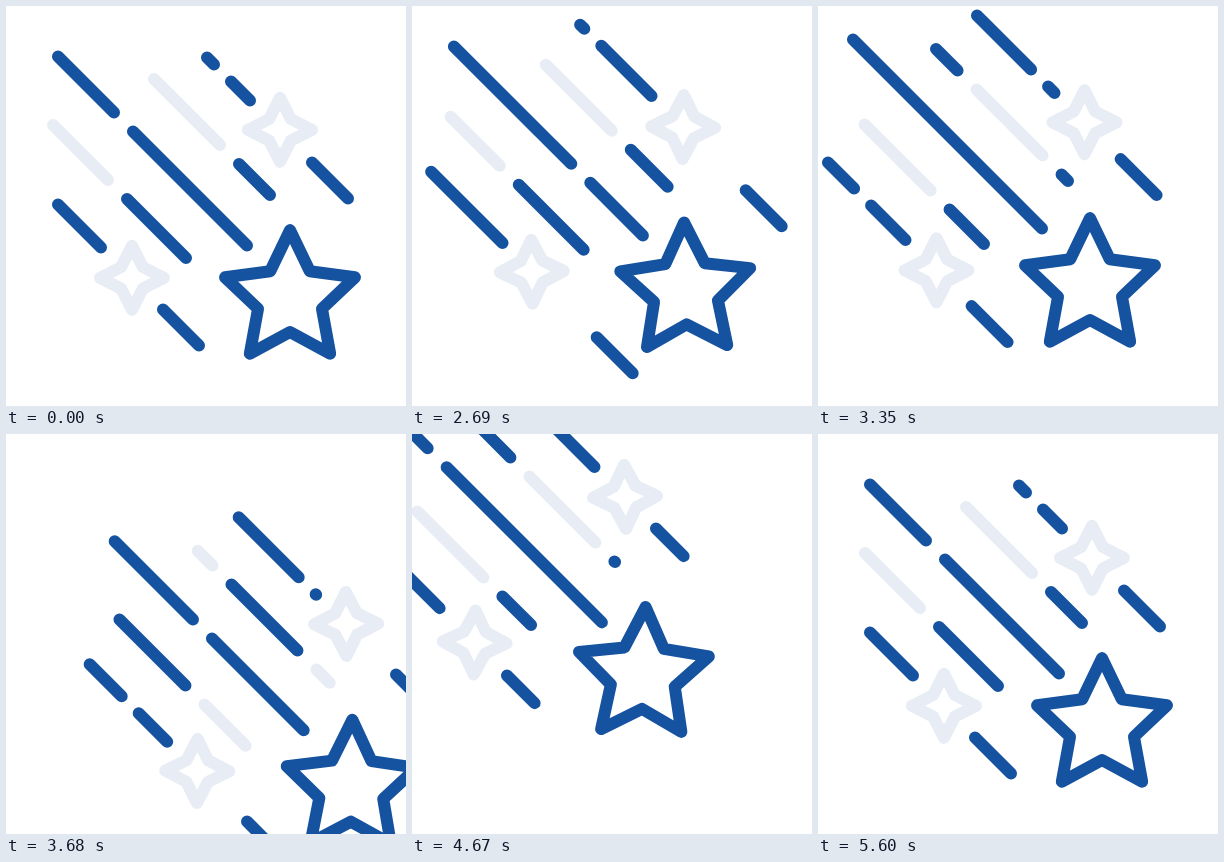
These frames come from a looping animation (400x400 px, 5630 ms). An HTML page:

```html
<!DOCTYPE html>
<html lang="en">
<head>
<meta charset="utf-8">
<title>Falling star</title>
<style>
  html, body { margin: 0; width: 100%; height: 100%; overflow: hidden; background: #fff; }
  svg { display: block; width: 100vw; height: 100vh; }
  path { fill: none; stroke-width: 12; stroke-linecap: round; stroke-linejoin: round; }
  .dark { stroke: #1552a0; }
  .light { stroke: #e7ecf5; }
</style>
</head>
<body>
<svg viewBox="0 0 400 400">
  <path id="pale" class="light"/>
  <path id="sparkA" class="light"/>
  <path id="sparkB" class="light"/>
  <path id="trail" class="dark"/>
  <path id="star" class="dark"/>
</svg>
<script>
const LOOP = 5630, STEP = 30;
// Pull back, launch off the corner, re-enter from the other one, settle.
const START = 2030, LAUNCH = 3350, WRAP = 3960, LAND = 5500;
const FLOW_END = 5450;

const $ = id => document.getElementById(id);
const { sin, cos, abs, max, min, pow, sqrt, PI } = Math;
const part = (t, from, to) => min(1, max(0, (t - from) / (to - from)));

// Diagonal offset of a group: slow pull back and fast launch, then a long landing.
function shift(t, pull, reach, bend = .75) {
  if (t >= WRAP) return -reach * pow(1 - sqrt(part(t, WRAP, LAND)), 1.87);
  return 400 * pow(part(t, LAUNCH, LAUNCH + 580), 3) - pull * pow(part(t, START, LAUNCH), bend);
}

// Backward travel of a dash pattern; a and b vary its pace.
function flow(t, distance, a, b) {
  const u = part(t, START, FLOW_END);
  return -distance * (u + a * sin(2 * PI * u) + b * sin(4 * PI * u));
}

// Visible pieces of a dash repeated along a diagonal, cut to [from, to].
function dashes(ox, oy, from, to, first, len, period, move) {
  let d = "", x = first + move;
  x -= Math.ceil((x + len - from) / period) * period;
  for (; x <= to; x += period) {
    const a = max(x, from), b = min(x + len, to);
    if (b >= a) d += `M${a + ox} ${a + oy}L${b + ox} ${b + oy}`;
  }
  return d;
}

function ring(points, outer, inner) {
  let d = "";
  for (let i = 0; i < points * 2; i++) {
    const r = i % 2 ? inner : outer, a = PI * i / points;
    d += (i ? "L" : "M") + (r * sin(a)).toFixed(2) + " " + (-r * cos(a)).toFixed(2);
  }
  return d + "Z";
}

$("star").setAttribute("d", ring(5, 68.3, 33.6));
$("sparkA").setAttribute("d", ring(4, 32, 15.3));
$("sparkB").setAttribute("d", ring(4, 32, 15.3));

function place(id, x, y, turn) {
  $(id).setAttribute("transform", `translate(${x} ${y}) rotate(${turn})`);
}

function drawTrails(t) {
  const outer = shift(t, 7.5, 515), middle = shift(t, 14, 510), core = shift(t, 17, 428);
  const opened = 1 - pow(1 - part(t, START, LAUNCH), 2.5);
  const tail = 52 - 34.5 * opened * (1 - part(t, 4400, 5400));

  let light = "";
  let dark = dashes(core, core - 1.5, 52, 241, 127, 191, 210, flow(t, 840, -.034, .024));

  const upper = flow(t, 840, -.035, .003), lower = flow(t, 840, .006, .02);
  for (const [ox, oy, first] of [[149, -.5, 76], [0, 146.5, 48]]) {
    dark += dashes(ox + outer, oy + outer, tail, 95, first, 88, 105, upper);
    dark += dashes(ox + outer, oy + outer, 156.5, 246, 157, 36, 105, lower);
  }

  const mixed = flow(t, 850, .003, .017);
  for (const [oy, from, to, first] of [[72, 47, 180, 36], [-75, 132, 264, 148]]) {
    light += dashes(middle, oy + middle, from, to, first, 66, 170, mixed);
    dark += dashes(middle, oy + middle, from, to, first + 85, 66, 170, mixed);
  }
  $("trail").setAttribute("d", dark);
  $("pale").setAttribute("d", light);
}

function drawStars(t) {
  const fade = t < START ? 0 : 1 - part(t, 5000, 5600);
  const c = fade * cos(PI * (t - START) / 2640), ahead = max(0, c);
  const star = shift(t, 12, 428, .35), spark = shift(t, 7.5, 510);
  const a = spark + 2.4 * ahead, b = spark - 2.4 * abs(c);
  place("star", 284 + star - 1.7 * c * c, 292.4 + star + 2.6 * ahead, -2 * c);
  place("sparkA", 274 + a, 123.8 + a, 1.7 * c);
  place("sparkB", 126 + b, 271.8 + b, -1.7 * c);
}

const begin = performance.now();
function tick() {
  let t = (performance.now() - begin) % LOOP;
  t = t < START ? 0 : START + Math.floor((t - START) / STEP) * STEP;
  drawTrails(t);
  drawStars(t);
  requestAnimationFrame(tick);
}
tick();
</script>
</body>
</html>
```
